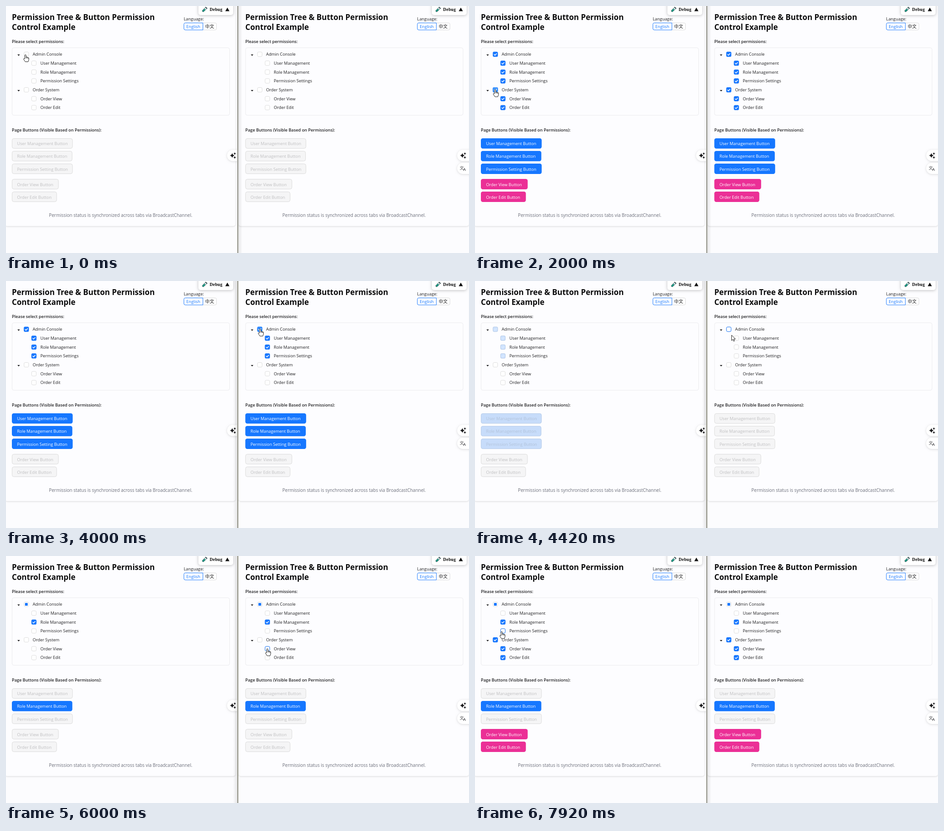
Recreate the animation shown at these times as an HTML page with a canvas. Size 1024x547 px, loop 8 s.

```html
<!DOCTYPE html>
<html lang="en">
<head>
<meta charset="utf-8">
<title>Permission tree</title>
<style>
html, body { margin: 0; width: 100%; height: 100%; overflow: hidden; background: #fcfcfe; }
canvas { display: block; }
</style>
</head>
<body>
<canvas id="stage" width="1024" height="547"></canvas>
<script>
const ctx = document.getElementById('stage').getContext('2d');
const LOOP = 8000, STEP = 1000 / 12, FADE = 250, LAG = 80;
const SANS = '"Open Sans", "Noto Sans", sans-serif';
const HAN = '"Noto Sans CJK SC", "Noto Sans CJK", sans-serif';
const INK = '#1f1f21', BLUE = '#1677ff', PINK = '#eb2f96', LINE = '#d9d9d9';
const PANES = [0, 516.3];

const ROWS = [
  { text: 'Admin Console', kids: [0, 1, 2] },
  { text: 'User Management', leaf: 0 },
  { text: 'Role Management', leaf: 1 },
  { text: 'Permission Settings', leaf: 2 },
  { text: 'Order System', kids: [3, 4] },
  { text: 'Order View', leaf: 3 },
  { text: 'Order Edit', leaf: 4 }
].map((r, i) => ({ ...r, y: 106.9 + i * 19.68, box: r.kids ? 45 : 61.8, x: r.kids ? 59 : 76 }));

const BUTTONS = [
  ['User Management Button', 304.4, 134, BLUE],
  ['Role Management Button', 332.4, 133.2, BLUE],
  ['Permission Setting Button', 360.5, 134, BLUE],
  ['Order View Button', 394.5, 103, PINK],
  ['Order Edit Button', 422.5, 99, PINK]
];

const CLICKS = [
  { at: 500, pane: 0, leaves: [0, 1, 2], on: 1 },
  { at: 1580, pane: 0, leaves: [3, 4], on: 1 },
  { at: 3330, pane: 1, leaves: [3, 4], on: 0 },
  { at: 4160, pane: 1, leaves: [0, 1, 2], on: 0 },
  { at: 4660, pane: 1, leaves: [1], on: 1 },
  { at: 6080, pane: 1, leaves: [3], on: 1 },
  { at: 7410, pane: 0, leaves: [4], on: 1 }
];

// pointer stops: time, x, y
const PATH = [
  [-1, 20, 130], [0, 43, 107.5], [800, 43, 107.5], [1080, 48, 192], [1330, 47, 190],
  [1500, 44.5, 185], [2100, 44.5, 185], [2420, 250, 150], [2580, 460, 126],
  [2750, 650, 127], [2920, 612, 168], [3080, 562, 184.5], [3500, 562, 184.5],
  [3830, 562, 106], [4330, 562, 106], [4580, 578, 146], [4920, 578, 146],
  [5080, 597, 203], [5170, 583, 213], [5420, 578, 205], [6325, 578, 205],
  [6326, 119, 207], [6490, 119, 207], [6750, 55, 217.5], [6920, 55, 217.5],
  [7080, 60, 224], [7460, 60, 224], [7660, 59, 167], [8000, 59, 167]
];

const clamp = v => Math.max(0, Math.min(1, v));
const ease = v => { v = clamp(v); return v * v * (3 - 2 * v); };
const rowAt = y => ROWS.find(r => Math.abs(y - r.y) < 8.2);

function pointer(t) {
  const i = PATH.findIndex(p => p[0] > t);
  if (i < 0) return PATH[PATH.length - 1].slice(1);
  if (i === 0) return PATH[0].slice(1);
  const [t0, x0, y0] = PATH[i - 1], [t1, x1, y1] = PATH[i];
  const k = (t - t0) / (t1 - t0);
  return [x0 + (x1 - x0) * k, y0 + (y1 - y0) * k];
}

function leafValues(t, pane) {
  const v = [0, 0, 0, 0, 0];
  for (const c of CLICKS) {
    const k = ease((t - c.at - (pane === c.pane ? 0 : LAG)) / FADE);
    for (const n of c.leaves) v[n] += (c.on - v[n]) * k;
  }
  return v;
}

function font(size, weight = 400, family = SANS) {
  ctx.font = `${weight} ${size}px ${family}`;
}

function text(str, x, y, size, color = INK, weight = 400, family = SANS) {
  font(size, weight, family);
  ctx.fillStyle = color;
  ctx.fillText(str, x, y);
}

function paint(fill, stroke, lw) {
  if (fill) { ctx.fillStyle = fill; ctx.fill(); }
  if (stroke) { ctx.strokeStyle = stroke; ctx.lineWidth = lw; ctx.stroke(); }
}

function rect(x, y, w, h, r, fill, stroke, lw = 1) {
  ctx.beginPath();
  ctx.roundRect(x, y, w, h, r);
  paint(fill, stroke, lw);
}

function poly(points, fill, stroke, lw = 1) {
  ctx.beginPath();
  points.forEach(([x, y]) => ctx.lineTo(x, y));
  ctx.closePath();
  paint(fill, stroke, lw);
}

function faded(alpha, draw) {
  if (alpha <= 0) return;
  ctx.save();
  ctx.globalAlpha *= alpha;
  draw();
  ctx.restore();
}

function shadowed(blur, dy, color, draw) {
  ctx.save();
  ctx.shadowBlur = blur;
  ctx.shadowOffsetY = dy;
  ctx.shadowColor = color;
  draw();
  ctx.restore();
}

// what the pointer touches: pane, row and 'box' or 'label'
function touch(x, y) {
  const pane = x > 513 ? 1 : 0, row = rowAt(y);
  if (!row) return {};
  x -= PANES[pane];
  font(9.25);
  const end = row.x + ctx.measureText(row.text).width + 3;
  let part = null;
  if (Math.abs(x - row.box) < 5.8 && Math.abs(y - row.y) < 5.8) part = 'box';
  else if (x > row.x - 3 && x < end) part = 'label';
  return { pane, row, part };
}

// hover fades over the three steps that follow the pointer
function hover(t, pane, row, part) {
  let n = 0;
  for (let i = 1; i <= 3; i++) {
    const h = touch(...pointer(t - i * STEP));
    if (h.pane === pane && h.row === row && h.part === part) n++;
  }
  return n / 3;
}

function checkbox(x, y, full, half, hot) {
  const l = x - 5.1, t = y - 5.1;
  rect(l, t, 10.2, 10.2, 2.6, '#fff', LINE, 0.9);
  faded(hot, () => rect(l, t, 10.2, 10.2, 2.6, null, BLUE));
  faded(half, () => rect(x - 3, y - 3, 6, 6, 0.5, BLUE));
  faded(full, () => {
    rect(x - 5.6, y - 5.6, 11.2, 11.2, 2.8, BLUE);
    faded(hot, () => rect(x - 5.6, y - 5.6, 11.2, 11.2, 2.8, '#4096ff'));
    ctx.beginPath();
    ctx.moveTo(x - 3, y);
    ctx.lineTo(x - 0.8, y + 2.2);
    ctx.lineTo(x + 3.1, y - 1.8);
    ctx.strokeStyle = '#fff';
    ctx.lineWidth = 1.5;
    ctx.stroke();
  });
}

function tree(t, pane, v) {
  rect(13.5, 92.5, 481, 149.5, 4, null, '#ebebee');
  for (const r of ROWS) {
    const set = r.kids ? r.kids.map(k => v[k]) : [v[r.leaf]];
    const full = Math.min(...set), half = Math.max(...set) - full;
    if (r.kids) poly([[25.2, r.y + 0.4], [30.8, r.y + 0.4], [28, r.y + 3.6]], INK);
    checkbox(r.box, r.y, full, half, hover(t, pane, r, 'box'));
    font(9.25);
    const w = ctx.measureText(r.text).width;
    faded(hover(t, pane, r, 'label'),
      () => rect(r.x - 3, r.y - 8.4, w + 6, 16.8, 4, 'rgba(0,0,0,.04)'));
    text(r.text, r.x, r.y + 3.4, 9.25);
  }
}

function button([label, y, w, color], on) {
  const top = y - 11.4;
  faded(1 - on, () => {
    rect(13.5, top + 0.5, w - 0.5, 21.8, 4, '#f5f5f6', LINE, 0.9);
    text(label, 24.4, y + 4, 9.3, '#bfbfc1');
  });
  faded(on, () => {
    rect(13, top, w + 0.5, 22.8, 4.2, color);
    text(label, 24.4, y + 4, 9.2, '#fff', 500);
  });
}

function debugTab() {
  shadowed(6, 1, 'rgba(0,0,0,.25)', () => rect(425.5, -8, 77, 28, 5, '#fff'));
  ctx.save();
  ctx.translate(439, 8);
  ctx.rotate(Math.PI / 4);
  rect(-1.9, -6, 3.8, 12, 1.9, '#d8eeee', '#23393b', 0.9);
  rect(-1.6, -1.5, 3.2, 7.1, 1.6, '#14967f');
  rect(-2.8, -6.6, 5.6, 1.8, 0.8, '#33484b');
  ctx.restore();
  ctx.letterSpacing = '0.4px';
  text('Debug', 450.5, 11, 9.5, '#000', 700, '"Liberation Serif", serif');
  ctx.letterSpacing = '0px';
  poly([[485, 11.4], [489.6, 3.6], [494.2, 11.4]], '#111');
}

function page(t, pane) {
  const v = leafValues(t, pane);
  shadowed(3, 1, 'rgba(0,0,0,.15)', () => rect(-2, -10, 509.5, 497.5, 5, '#fdfdff'));
  text('Permission Tree & Button Permission', 13, 30.8, 17.1, '#0b0b0c', 700);
  text('Control Example', 13, 53.4, 17.1, '#0b0b0c', 700);
  text('Language:', 393, 31.7, 9.35);
  rect(435, 37.5, 30.5, 15.5, [0, 3, 3, 0], '#fff', LINE);
  rect(393.5, 37.5, 42, 15.5, [3, 0, 0, 3], '#fff', BLUE);
  text('English', 398.8, 48.5, 9.35, BLUE);
  text('中文', 440.6, 48.7, 9.8, INK, 400, HAN);
  text('Please select permissions:', 13, 82, 9.23, INK, 600);
  tree(t, pane, v);
  text('Page Buttons (Visible Based on Permissions):', 13, 277.6, 9.23, INK, 600);
  BUTTONS.forEach((b, i) => button(b, v[i]));
  text('Permission status is synchronized across tabs via BroadcastChannel.', 95, 466.8, 9.97, '#6b6e7a');
  debugTab();
}

function star(x, y, r) {
  ctx.beginPath();
  ctx.moveTo(x, y - r);
  for (let i = 1; i <= 4; i++) {
    const a = i * Math.PI / 2 - Math.PI / 2, m = a - Math.PI / 4;
    ctx.quadraticCurveTo(x + Math.cos(m) * r * 0.25, y + Math.sin(m) * r * 0.25,
      x + Math.cos(a) * r, y + Math.sin(a) * r);
  }
  paint('#1c1c1e');
}

function bubble(x, y) {
  shadowed(5, 1, 'rgba(0,0,0,.14)', () => rect(x - 12.5, y - 12.5, 40, 25, 12.5, '#fff'));
}

function sparkles(x) {
  bubble(x, 331);
  star(x - 1.2, 331, 5.6);
  star(x + 4.4, 326.8, 2.9);
  star(x + 4.4, 335.4, 2.9);
}

function translator(x, y) {
  bubble(x, y);
  text('文', x - 7, y + 2.8, 9.2, '#4a4a4d', 500, HAN);
  text('A', x + 0.4, y + 5.6, 9, '#4a4a4d', 600);
}

// the window in front casts its shadow over the other one
function divider(t) {
  const right = t >= 3080 && t < 6900;
  const g = ctx.createLinearGradient(right ? 511 : 514, 0, right ? 502 : 523, 0);
  g.addColorStop(0, 'rgba(0,0,0,.09)');
  g.addColorStop(1, 'rgba(0,0,0,0)');
  ctx.fillStyle = g;
  ctx.fillRect(right ? 502 : 514, 0, 9, 547);
  const colors = right ? ['#d4d4cc', '#74746a', '#b4b4a6'] : ['#cbcbc7', '#84847c', '#b2b2a8'];
  colors.forEach((c, i) => {
    ctx.fillStyle = c;
    ctx.fillRect(511 + i, 0, 1, 547);
  });
}

function arrow(x, y) {
  poly([[0, 0], [0, 12], [2.7, 9.5], [4.6, 13.6], [6.5, 12.8], [4.7, 8.8], [8.4, 8.6]]
    .map(([a, b]) => [x + a, y + b]), '#fff', '#111', 0.95);
}

function hand(x, y) {
  ctx.save();
  ctx.translate(x, y);
  ctx.beginPath();
  ctx.moveTo(-1.4, 9.4);
  ctx.lineTo(-1.4, 1.2);
  ctx.quadraticCurveTo(0, -0.8, 1.4, 1.2);
  ctx.lineTo(1.4, 5.4);
  ctx.quadraticCurveTo(3, 4.6, 3.8, 6.1);
  ctx.quadraticCurveTo(5.2, 5.3, 5.9, 6.9);
  ctx.quadraticCurveTo(7.5, 6.5, 7.5, 8.4);
  ctx.lineTo(7.3, 12);
  ctx.lineTo(5.9, 16);
  ctx.lineTo(-0.4, 16);
  ctx.lineTo(-4, 10.6);
  ctx.quadraticCurveTo(-4.2, 8.2, -2.2, 8.8);
  ctx.closePath();
  paint('#fff');
  ctx.moveTo(1.4, 5.4); ctx.lineTo(1.4, 8.4);
  ctx.moveTo(3.7, 6.1); ctx.lineTo(3.7, 8.6);
  ctx.moveTo(5.8, 6.9); ctx.lineTo(5.8, 8.9);
  ctx.lineJoin = 'round';
  paint(null, '#111', 0.95);
  ctx.restore();
}

function clip(x, w, draw) {
  ctx.save();
  ctx.beginPath();
  ctx.rect(x, 0, w, 547);
  ctx.clip();
  draw();
  ctx.restore();
}

function render(t) {
  ctx.fillStyle = '#fcfcfe';
  ctx.fillRect(0, 0, 1024, 547);
  PANES.forEach((x, pane) => clip(pane ? 513 : 0, 511, () => {
    ctx.save();
    ctx.translate(x, 0);
    page(t, pane);
    ctx.restore();
    sparkles(pane ? 1010.5 : 501.5);
    if (pane) translator(1010.5, 359.5);
  }));
  divider(t);
  const [x, y] = pointer(t);
  (touch(x, y).part ? hand : arrow)(x, y);
}

const start = performance.now();
function frame() {
  const t = (performance.now() - start) % LOOP;
  render(Math.floor((t + 4) / STEP) * STEP);
  requestAnimationFrame(frame);
}
frame();
</script>
</body>
</html>
```
